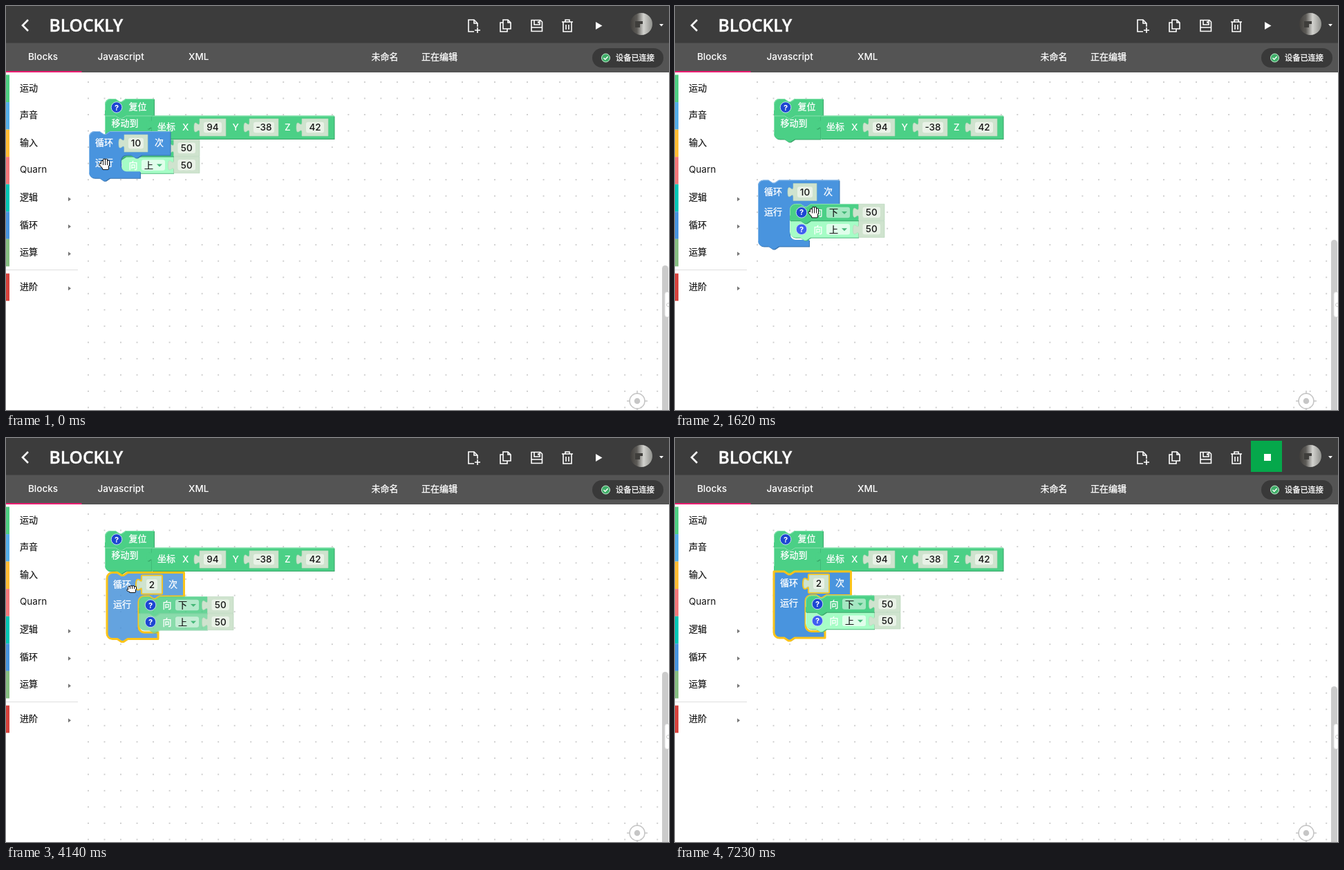
Recreate the animation shown at these times as an HTML page. Size 959 by 584 pixels, loop 8.14 s.

```html
<!DOCTYPE html>
<html lang="zh-CN">
<head>
<meta charset="utf-8">
<title>Block editor</title>
<style>
html, body { margin: 0; width: 100%; height: 100%; overflow: hidden; background: #fff; }
svg { display: block; }
text { font: 500 13.5px Inter, "Noto Sans CJK SC", "Noto Sans CJK", sans-serif; fill: #fff; }
.cn { font-size: 13px; stroke: #fff; stroke-width: .3; }
.ink { fill: #151515; }
.cn.ink { stroke: #151515; stroke-width: .2; }
.mid { text-anchor: middle; }
.thin { font-weight: 400; }
.logo { font: 600 24.6px "Open Sans", "Noto Sans", sans-serif; stroke: #fff; stroke-width: .4; }
.pill { font-size: 11.2px; stroke: #fff; stroke-width: .3; }
.tip { font-size: 9.5px; }
.mark { font: 700 11px Inter, sans-serif; text-anchor: middle; }
.icon { fill: none; stroke: #fff; stroke-width: 1.6; }
.sel { fill: none; stroke: #fcc419; stroke-width: 3; stroke-linejoin: round; }
.drag .body { fill-opacity: .75; }
.drag .edge { opacity: .35; }
</style>
</head>
<body>
<svg width="959" height="584" viewBox="0 0 959 584">
  <defs>
    <pattern id="dots" x="107.24" y="98.24" width="23.52" height="23.52" patternUnits="userSpaceOnUse">
      <circle cx="11.76" cy="11.76" r=".95" fill="#bdbdbd"/>
    </pattern>
    <linearGradient id="face">
      <stop offset="0" stop-color="#403e3b"/>
      <stop offset=".3" stop-color="#5d5b57"/>
      <stop offset=".6" stop-color="#d2d2ce"/>
      <stop offset="1" stop-color="#8f908c"/>
    </linearGradient>
  </defs>

  <rect width="959" height="584" fill="#fff"/>
  <rect x="105" y="96" width="854" height="488" fill="url(#dots)"/>
  <g id="work"></g>

  <g fill="none" stroke="#c6c6c6" stroke-width="1.5">
    <circle cx="913" cy="571" r="11"/>
    <path d="M913,556v5M913,581v5M898,571h5M923,571h5"/>
    <circle cx="913" cy="571" r="3.5" fill="#c6c6c6"/>
  </g>
  <rect id="bar" x="949" width="9" height="260" rx="4.5" fill="#cbcbcb"/>
  <path d="M960,413.5h-4a3,3 0 0 0-3,3v30a3,3 0 0 0 3,3h4" fill="#fff" stroke="#ddd"/>
  <circle cx="958" cy="432" r="2.5" fill="none" stroke="#ccc"/>

  <rect y="96" width="104" height="488" fill="#fff"/>
  <g id="menu"></g>
  <path d="M0,381.5H104" stroke="#dedede"/>

  <rect width="959" height="54" fill="#3c3c3c"/>
  <rect y="53.5" width="959" height="42.5" fill="#545454"/>
  <rect y="94" width="109.5" height="2" fill="#ec1d72"/>
  <path d="M32,20l-8,8 8,8" class="icon" style="stroke-width:2.6"/>
  <text x="62.5" y="36.5" class="logo">BLOCKLY</text>
  <text x="32" y="78">Blocks</text>
  <text x="132.5" y="78">Javascript</text>
  <text x="264" y="78">XML</text>
  <text x="528.5" y="78" class="cn">未命名</text>
  <text x="601" y="78" class="cn">正在编辑</text>

  <g class="icon">
    <path d="M677,37h-8V20h8l5,5v5M677,20v5h5M682,31v8M678,35h8"/>
    <path d="M719,20h7l4,4v9h-11zM726,20v4h4M719,24h-4v13h10v-4"/>
    <path d="M760,20.5h13l2.5,2.5v13.5h-15.5zM764,21v6h8v-6M770,22v3M760,31h15"/>
    <path d="M804,23h16M809,23v-3h6v3M806,23v14h12v-14M810,27v7M814,27v7"/>
  </g>
  <circle cx="919" cy="26" r="16" fill="url(#face)"/>
  <path d="M910,22h11v4h-4v5h-7z" fill="#3f3e3b"/>
  <path d="M945,26h6l-3,3.5z" fill="#fff"/>

  <rect x="848" y="61" width="103" height="28" rx="14" fill="#393939"/>
  <circle cx="867.5" cy="75" r="6" fill="#3fae68" stroke="#c9f0d6"/>
  <path d="M864.5,75l2.2,2.2 4-4.2" class="icon" style="stroke-width:1.4"/>
  <text x="882" y="78.5" class="pill">设备已连接</text>

  <g id="run"></g>
  <g id="mouse"></g>
</svg>
<script>
const LOOP = 8140;
// bursts of screen updates: first, last, count
const BURSTS = [[150, 1180, 8], [1320, 2210, 7], [2960, 3990, 8],
                [4140, 5170, 8], [5320, 5900, 5], [6480, 7230, 6]];
const ticks = [0];
for (const [a, b, n] of BURSTS)
  for (let i = 0; i < n; i++) ticks.push(Math.round(a + (b - a) * i / (n - 1)));

const GREEN = { body: '#4bd086', dark: '#39a568', light: '#8be3b1' };
const LIT = { body: '#a6fdc6', dark: '#4fb97d', light: '#d3ffe2', lit: true };
const SOFT = { body: '#79dba0', dark: '#39a568', light: '#a9ecc5' };
const BLUE = { body: '#4994de', dark: '#3773ae', light: '#86b9ea' };

const $ = id => document.getElementById(id);
const within = (t, a, b) => t >= a && t < b;
const text = (x, y, s, cls = '') => `<text x="${x}" y="${y}" class="${cls}">${s}</text>`;
const group = (x, y, inner, cls = '') =>
  `<g transform="translate(${x},${y})" class="${cls}">${inner}</g>`;

function along(t, keys) {
  const i = keys.findIndex(k => k[0] > t);
  if (i < 0) return keys[keys.length - 1].slice(1);
  if (i === 0) return keys[0].slice(1);
  const [t0, x0, y0] = keys[i - 1], [t1, x1, y1] = keys[i];
  const k = (t - t0) / (t1 - t0);
  return [x0 + (x1 - x0) * k, y0 + (y1 - y0) * k];
}

// block outlines
const upper = (w, h, sharp) => `M0,${h - 8}` +
  (sharp ? 'V0H15' : 'V8A8,8 0 0 1 8,0H15') + `l6,4 3,0 6,-4H${w}`;
const lower = (h, joined) => `V${h}H30l-6,4-3,0-6,-4` +
  (joined ? 'H0Z' : `H8A8,8 0 0 1 0,${h - 8}Z`);
const plugTop = w => `M0,0H${w}`;
const plugRest = h => `V${h}H0V20c0,-10 -8,8 -8,-7.5s8,2.5 8,-7.5Z`;

function shape(top, rest, c, selected) {
  const d = top + rest;
  return `<path d="${d}" fill="${c.dark}" class="edge" transform="translate(1,1)"/>` +
    `<path d="${d}" fill="${c.body}" class="body"/>` +
    `<path d="${top}" fill="none" stroke="${c.light}" class="edge" transform="translate(.5,.5)"/>` +
    (selected ? `<path d="${d}" class="sel"/>` : '');
}

function value(x, y, w, h, s, { selected, editing } = {}) {
  const d = plugTop(w) + plugRest(h), cy = h / 2;
  return group(x, y,
    (selected ? `<path d="${d}" class="sel" style="stroke-width:4"/>` : '') +
    `<path d="${d}" fill="#cfe3ce" stroke="#b4d3b8" stroke-width=".6"/>` +
    `<rect x="6" y="${cy - 7.75}" width="${w - 12}" height="15.5" rx="3" fill="#e9f2e7"/>` +
    (editing ? `<rect x="5" y="${cy - 8}" width="15" height="16" fill="#b3d4f7"/>` : '') +
    text(editing ? 14 : w / 2, cy + 4.9, s, 'ink mid'));
}

const help = lit => `<circle cx="17" cy="12.5" r="7.8" fill="${lit ? '#3f5ff0' : '#1d46d2'}" stroke="#d5e6f5" stroke-width=".9"/>` +
  text(17, 16.6, '?', 'mark');

function step(y, word, c, { sharp, joined, selected } = {}) {
  return group(0, y,
    shape(upper(99, 24.4, sharp), lower(24.4, joined), c, selected) +
    help(c.lit) + text(34.5, 17.3, '向', 'cn') +
    `<rect x="53" y="4.8" width="34" height="15.5" rx="3" fill="#fff" fill-opacity="${c.lit ? .65 : .5}"/>` +
    text(57, 17.3, word, 'cn ink') +
    `<path d="M75,11h8l-4,4z" fill="#45b878"/>` +
    value(99.5, .4, 37.5, 23.8, '50'));
}

const MOUTH = { x: 46, y: 34.4 };
function repeat(count, mouth, opt) {
  const field = count > 9 ? 34 : 28, w = field + 83.5;
  const end = MOUTH.y + mouth, h = end + 9.6;
  const inner = `V${MOUTH.y}H76l-6,4-3,0-6,-4H54a8,8 0 0 0-8,8V${end - 8}a8,8 0 0 0 8,8H74`;
  return shape(upper(w, h, opt.sharp), inner + lower(h), BLUE, opt.selected) +
    text(9, 21, '循环', 'cn') + text(9, 50, '运行', 'cn') + text(field + 61, 21, '次', 'cn') +
    value(51, 5, field, 25, count, opt);
}

function fixed(resetColor, moveColor, joined) {
  const coord = [['X', 255, 280, 38, 94], ['Y', 327.5, 352, 42, -38], ['Z', 403, 428, 38, 42]]
    .map(([n, tx, x, w, v]) => text(tx, 179.5, n) + value(x, 163, w, 25, v)).join('');
  return group(143, 134, shape(upper(71, 24.4), lower(24.4, true), resetColor) +
      help(resetColor.lit) + text(34.5, 16.3, '复位', 'cn')) +
    group(143, 158.4, shape(upper(67.5, 34.2, true), lower(34.2, joined), moveColor) +
      text(9.5, 16, '移动到', 'cn')) +
    group(211, 158.6, shape(plugTop(263.5), plugRest(33.4), GREEN)) +
    text(219, 179.3, '坐标', 'cn') + coord;
}

// mouse pointers: white strokes over wider black ones
const HANDS = {
  open: 'M-4,1V-4M-1,1V-6.5M2,1V-6.5M5,1V-4.5M-6.5,0L-3,4M-3,2H4V6H-2Z',
  fist: 'M-4,1V-1M-1,1V-2M2,1V-2M5,1V-1M-5.5,3L-3,4M-3,2H4V5H-2Z',
  point: 'M-2,1V-6M1,1V-1M3.5,1V-.5M6,1V0M-5,0L-2,4M-2,2H5V6H-1Z'
};
function pointer(kind, x, y) {
  if (kind === 'beam') return group(x, y,
    '<path d="M-3,-7q3,0 3,2V5q0,2 -3,2M3,-7q-3,0 -3,2M0,5q0,2 3,2M-2,1h4" fill="none" stroke="#111" stroke-width="1.3"/>');
  const stroke = (color, w) => `<path d="${HANDS[kind]}" fill="${color}" stroke="${color}" stroke-width="${w}" stroke-linecap="round" stroke-linejoin="round"/>`;
  return group(x, y, stroke('#111', 4) + stroke('#fff', 2));
}

// paths: time, x, y
const loopPath = [[150, 120, 181], [591, 120, 251.5], [3548, 120, 251.5], [3695, 146, 230],
  [3842, 166, 208], [3990, 160, 199], [4140, 146, 194.6], [4287, 143, 193]];
const pairPath = [[886, 143, 193], [1320, 186, 295.2], [1468, 176, 290]];
const mousePath = [[150, 143, 229], [591, 143, 299], [886, 173, 211], [1320, 216, 313],
  [1468, 206, 307], [1765, 196, 290], [2062, 190, 267], [3107, 190, 267], [3401, 175, 264],
  [3548, 156, 273], [3695, 182, 252], [3842, 202, 230], [3990, 196, 221], [4140, 182, 217],
  [4287, 179, 215], [4729, 560, 130], [5170, 856, 57], [5320, 860, 43], [6480, 860, 43],
  [6630, 850, 150], [7080, 770, 530]];

function blocks(t) {
  const nested = t >= 1600, grabLoop = within(t, 3600, 4200), grabPair = within(t, 900, 1600);
  const moved = t >= 900, placed = t >= 4200;
  const [lx, ly] = along(t, loopPath);
  const pos = nested ? [lx + MOUTH.x, ly + MOUTH.y] : along(t, pairPath);

  let down = GREEN, up = grabLoop || grabPair ? SOFT : LIT;
  if (t >= 5400) {
    const first = within(t, 5890, 6480) || within(t, 6780, 7200);
    down = first ? LIT : GREEN;
    up = t >= 6480 && !first ? LIT : GREEN;
  }
  const pair = group(...pos,
    step(24.4, '上', up, { sharp: true }) +
    step(0, '下', down, { sharp: !moved, joined: true, selected: grabPair }),
    grabPair || grabLoop ? 'drag' : '');
  const loop = group(lx, ly, repeat(t < 2950 ? 10 : 2, nested ? 52 : 23.8, {
    sharp: placed,
    selected: within(t, 290, 880) || within(t, 2050, 3250) || t >= 3540,
    editing: within(t, 2200, 2950)
  }), grabLoop ? 'drag' : '');
  const base = fixed(within(t, 5400, 5600) ? LIT : GREEN, within(t, 5600, 5890) ? LIT : GREEN,
    !moved || placed);
  return base + (moved ? loop + pair : pair + loop);
}

function runButton(t) {
  const hover = within(t, 5320, 6480), running = t >= 5400;
  const fill = hover && running ? '#ee3529' : '#05a84b';
  return (t >= 5320 ? `<rect x="833" y="4" width="45" height="45" fill="${fill}"/>` : '') +
    `<path d="${running ? 'M852,23h10v10h-10z' : 'M853,23l9.5,5.5-9.5,5.5z'}" fill="#fff"/>` +
    (hover ? '<rect x="839" y="51" width="33" height="20" rx="1" fill="#5d5d5d"/>' +
      text(846, 64.5, '运行', 'tip') : '');
}

function mouse(t) {
  if (t >= 7200) return '';
  const held = within(t, 290, 580) || within(t, 880, 1600) || within(t, 3540, 4200);
  const kind = held ? 'fist' : within(t, 2050, 3250) ? 'beam' : within(t, 5100, 6600) ? 'point' : 'open';
  return pointer(kind, ...along(t, mousePath));
}

$('menu').innerHTML = [['运动', '#4ed083'], ['声音', '#55aeea'], ['输入', '#ffbd35'], ['Quarn', '#f5787b'],
  ['逻辑', '#00c8b7', 1], ['循环', '#4895e0', 1], ['运算', '#87bf82', 1], ['进阶', '#d8423d', 1]]
  .map(([name, color, more], i) => {
    const y = 99.5 + i * 39.55 + (i > 6 ? 10.3 : 0);
    return `<rect y="${y}" width="5" height="39.6" fill="${color}"/>` +
      text(20, y + 23.3, name, name === 'Quarn' ? 'ink thin' : 'cn ink') +
      (more ? `<path d="M90,${y + 18.5}l4,3-4,3z" fill="#777"/>` : '');
  }).join('');

let shown = -1;
function frame() {
  const t = performance.now() % LOOP;
  const tick = ticks.filter(k => k <= t).pop();
  if (tick !== shown) {
    shown = tick;
    $('work').innerHTML = blocks(tick);
    $('run').innerHTML = runButton(tick);
    $('mouse').innerHTML = mouse(tick);
    $('bar').setAttribute('y', tick < 580 ? 375 : tick < 1600 ? 349 : tick < 4200 ? 338 : 359);
  }
  requestAnimationFrame(frame);
}
frame();
</script>
</body>
</html>
```
